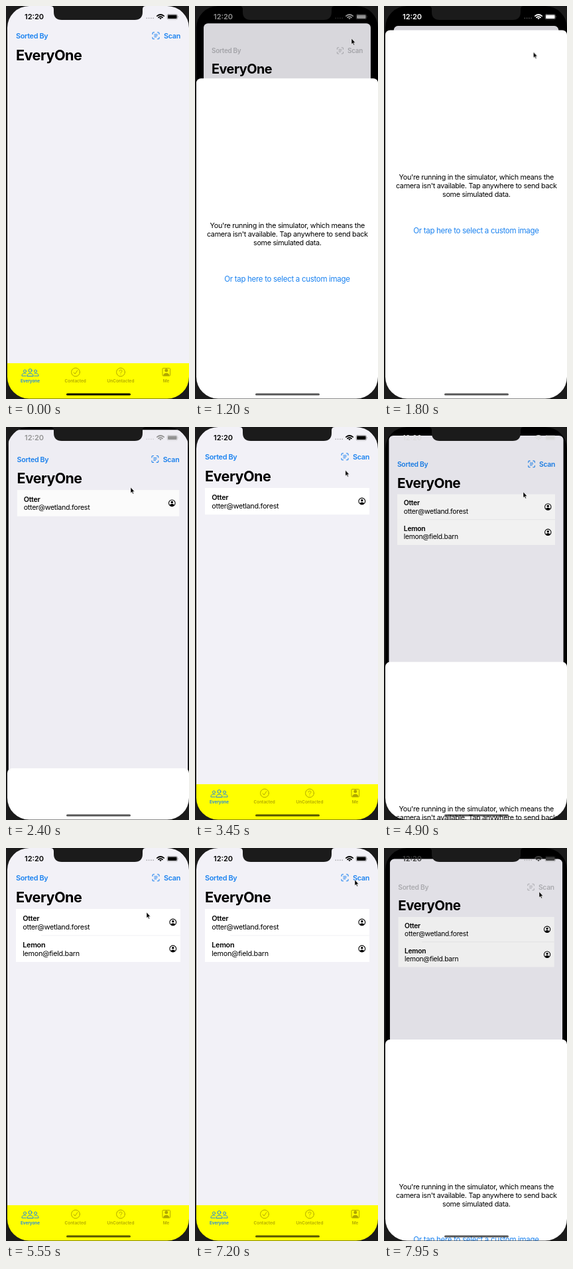
These frames come from a looping animation (276 by 593 pixels, 8 s). An HTML page:

```html
<!DOCTYPE html>
<html lang="en">
<head>
<meta charset="utf-8">
<title>Contact list</title>
<style>
@property --up { syntax: "<number>"; inherits: true; initial-value: 0; }
@property --down { syntax: "<number>"; inherits: true; initial-value: 0; }
@property --p { syntax: "<number>"; inherits: true; initial-value: 0; }

html, body { margin: 0; width: 100%; height: 100%; overflow: hidden; background: #000; }

/* --up and --down are clocks of two critically damped springs;
   --p runs from 0 (list only) to 1 (sheet fully up) */
svg {
  --p: calc((1 + var(--down)) * exp(-1 * var(--down)) - (1 + var(--up)) * exp(-1 * var(--up)));
  display: block;
  width: 276px;
  height: 593px;
  font: 10.8px Inter, "Open Sans", sans-serif;
  letter-spacing: -.3px;
  animation: up 8s linear infinite, down 8s linear infinite;
}
.semi { font-weight: 600; }
.title { font-size: 21.6px; font-weight: 700; letter-spacing: -.55px; }
.time { font-size: 11px; font-weight: 600; letter-spacing: 0; }
.tabs { font-size: 6.4px; font-weight: 600; letter-spacing: 0; text-anchor: middle; }
.note { text-anchor: middle; }
.link { font-size: 11.5px; fill: #1a82f0; }
.line { fill: none; stroke: currentColor; stroke-linecap: round; stroke-linejoin: round; }
.blue { color: #1a82f0; }
.olive { color: #b0a800; }
.fill { fill: currentColor; }

.card {
  transform: translate(139px, calc(30.2px * var(--p))) scale(calc(1 - .0931 * var(--p))) translate(-139px, 0);
}
.dim { opacity: calc(.124 * var(--p)); }
.sheet { transform: translateY(calc(593px - 558px * var(--p))); }

.nav { animation: tint 8s linear infinite; }
.status { animation: status 8s linear infinite; }
.home { animation: home 8s linear infinite; }
.first { animation: first 8s step-end infinite; }
.second { animation: second 8s step-end infinite; }
.cursor { animation: cursor 8s ease-in-out infinite; }

@keyframes up {
  0%, 11.25%, 35.1%, 52.49%, 67.98%, 97.44% { --up: 0; }
  20%, 35.09%, 59.22%, 67.97% { --up: 8.2; }
  52.5% { --up: 1.884; }
  100% { --up: 2.4; }
}
@keyframes down {
  0%, 26.34%, 35.1%, 59.22%, 67.98%, 100% { --down: 0; }
  35.09%, 67.97% { --down: 8.2; }
}
@keyframes tint {
  0%, 11.25%, 28%, 52.49%, 60.5%, 97.44% { color: #1a82f0; }
  13%, 26.34%, 52.5%, 59.22%, 98.7%, 100% { color: #b7b7bc; }
}
@keyframes status {
  0%, 11.25%, 35%, 52.49%, 67.5%, 97.44% { color: #000; }
  17.8%, 26.34%, 57%, 60.2% { color: #fff; }
  52.5% { color: #484848; }
  100% { color: #505050; }
}
@keyframes home {
  0%, 11.25% { opacity: 1; }
  13%, 100% { opacity: .66; }
}
@keyframes first {
  0% { opacity: 0; }
  26.34%, 100% { opacity: 1; }
}
@keyframes second {
  0% { opacity: 0; }
  59.22%, 100% { opacity: 1; }
}
@keyframes cursor {
  0%, 3.12% { opacity: 0; transform: translate(257px, 570px); }
  3.125% { opacity: 1; transform: translate(257px, 570px); animation-timing-function: step-end; }
  3.75%, 5.6% { transform: translate(236px, 54px); }
  6.25%, 16.2% { transform: translate(236px, 49px); }
  20%, 21.6% { transform: translate(232px, 65px); }
  25%, 26.8% { transform: translate(188px, 95px); }
  29%, 37.4% { transform: translate(188px, 91px); }
  47.5%, 55.6% { transform: translate(251px, 49px); }
  58.75%, 69.3% { transform: translate(210px, 98px); }
  69.375%, 71.8% { transform: translate(212px, 97px); }
  80%, 90% { transform: translate(241px, 48px); }
  99.3%, 100% { opacity: 1; transform: translate(234px, 66px); }
}
</style>
</head>
<body>
<svg viewBox="0 0 276 593">
  <defs>
    <g id="badge">
      <circle class="line" r="4.9" stroke-width="1.1"/>
      <circle cy="-1.2" r="1.75"/>
      <path d="M-3.3 3.4C-2.6 .7 2.6 .7 3.3 3.4A4.7 4.7 0 0 1-3.3 3.4Z"/>
    </g>
    <g id="bust">
      <circle r="2.5" cy="-3"/>
      <path d="M-4.6 5.2C-4.6-.2 4.6-.2 4.6 5.2Z"/>
    </g>
  </defs>

  <rect width="276" height="593"/>

  <g class="card">
    <rect x="2" width="274" height="593" rx="7" fill="#f2f1f7"/>

    <g class="nav">
      <text class="semi fill" x="15" y="49">Sorted By</text>
      <text class="semi fill" x="238" y="49">Scan</text>
      <g class="line" transform="translate(226 44.8)" stroke-width="1.1">
        <path d="M-5-2.4V-3.6Q-5-5-3.6-5H-2.4M2.4-5H3.6Q5-5 5-3.6V-2.4M5 2.4V3.6Q5 5 3.6 5H2.4M-2.4 5H-3.6Q-5 5-5 3.6V2.4"/>
        <path d="M-2.2-2H2.2M-2.2 0H2.2M-2.2 2H.8" stroke-width=".9"/>
      </g>
    </g>

    <text class="title" x="15" y="82">EveryOne</text>

    <g class="first">
      <rect x="15" y="92" width="248" height="40.2" fill="#fff"/>
      <text class="semi" x="25.3" y="109.8">Otter</text>
      <text x="25.3" y="122.6">otter@wetland.forest</text>
      <use href="#badge" x="251.8" y="112"/>
    </g>
    <g class="second">
      <rect x="15" y="132" width="248" height="40" fill="#fff"/>
      <path d="M53 132H263" stroke="#e8e8ec" stroke-width=".6"/>
      <text class="semi" x="25.3" y="149.8">Lemon</text>
      <text x="25.3" y="162.6">lemon@field.barn</text>
      <use href="#badge" x="251.8" y="152"/>
    </g>

    <g class="tabs">
      <rect x="2" y="539" width="274" height="54" fill="#ff0"/>
      <g class="blue">
        <g class="line" transform="translate(36.5 553)">
          <use href="#bust"/>
          <g stroke-width=".9">
            <circle cx="-8" cy="-2" r="2"/>
            <circle cx="8" cy="-2" r="2"/>
            <path d="M-6.2 5.2H-12.6C-12.6 1-8.6 .4-6.2 1.8M6.2 5.2H12.6C12.6 1 8.6 .4 6.2 1.8"/>
          </g>
        </g>
        <text class="fill" x="36.5" y="568.3">Everyone</text>
      </g>
      <g class="olive">
        <g class="line">
          <circle cx="105" cy="552.5" r="6.4"/>
          <path d="M102.2 552.8L104.2 555.2 107.8 549.8"/>
          <circle cx="173" cy="552.5" r="6.4"/>
          <path d="M171.1 550.9C171.2 548.5 175 548.6 175 550.8C175 552.3 173 552.3 173 553.9M173 555.9V556"/>
          <rect x="236" y="546.5" width="11.6" height="11.6" rx="1.2"/>
        </g>
        <use class="fill" href="#bust" x="241.8" y="552.7"/>
        <g class="fill">
          <text x="104.7" y="568.3">Contacted</text>
          <text x="173" y="568.3">UnContacted</text>
          <text x="241.5" y="568.3">Me</text>
        </g>
      </g>
    </g>

    <rect class="dim" x="2" width="274" height="593" rx="7"/>
  </g>

  <g class="status">
    <text class="time fill" x="28" y="20.3">12:20</text>
    <path class="line" d="M212.3 18.3H224" stroke-width="1.8" stroke-dasharray="0 3.3" opacity=".3"/>
    <path class="line" d="M227.8 15.2Q233 10.8 238.2 15.2M229.9 17.4Q233 14.9 236.1 17.4" stroke-width="1.7"/>
    <path class="fill" d="M233 20.3L231.2 18.5Q233 17.2 234.8 18.5Z"/>
    <rect class="line" x="243" y="12.6" width="15.6" height="7.4" rx="2" stroke-width=".6" opacity=".5"/>
    <rect class="fill" x="244" y="13.6" width="13.6" height="5.4" rx="1.2"/>
    <path class="fill" d="M259.4 15Q260.7 16.3 259.4 17.6Z" opacity=".5"/>
  </g>

  <g class="sheet">
    <rect x="2" width="274" height="620" rx="7" fill="#fff"/>
    <g class="note">
      <text x="139.3" y="225.8">You're running in the simulator, which means the</text>
      <text x="139.3" y="238.8">camera isn't available. Tap anywhere to send back</text>
      <text x="139.3" y="251.8">some simulated data.</text>
      <text class="link" x="139" y="306.3">Or tap here to select a custom image</text>
    </g>
  </g>

  <rect class="home" x="91" y="584.4" width="97" height="3.2" rx="1.6"/>

  <path fill="#1b1b1b" fill-rule="evenodd" d="M0 0H276V593H0Z
    M35 0H67Q72 0 72 5V9Q72 21 84 21H194Q206 21 206 9V5Q206 0 211 0H243
    A33 33 0 0 1 276 33V559.5A33 33 0 0 1 243 592.5H35A33 33 0 0 1 2 559.5V33A33 33 0 0 1 35 0Z"/>

  <g class="cursor">
    <path d="M0 0V8.6L1.9 6.9 3.3 10 4.6 9.4 3.2 6.4H5.8Z" stroke="#fff" stroke-width=".5"/>
  </g>
</svg>
</body>
</html>
```
